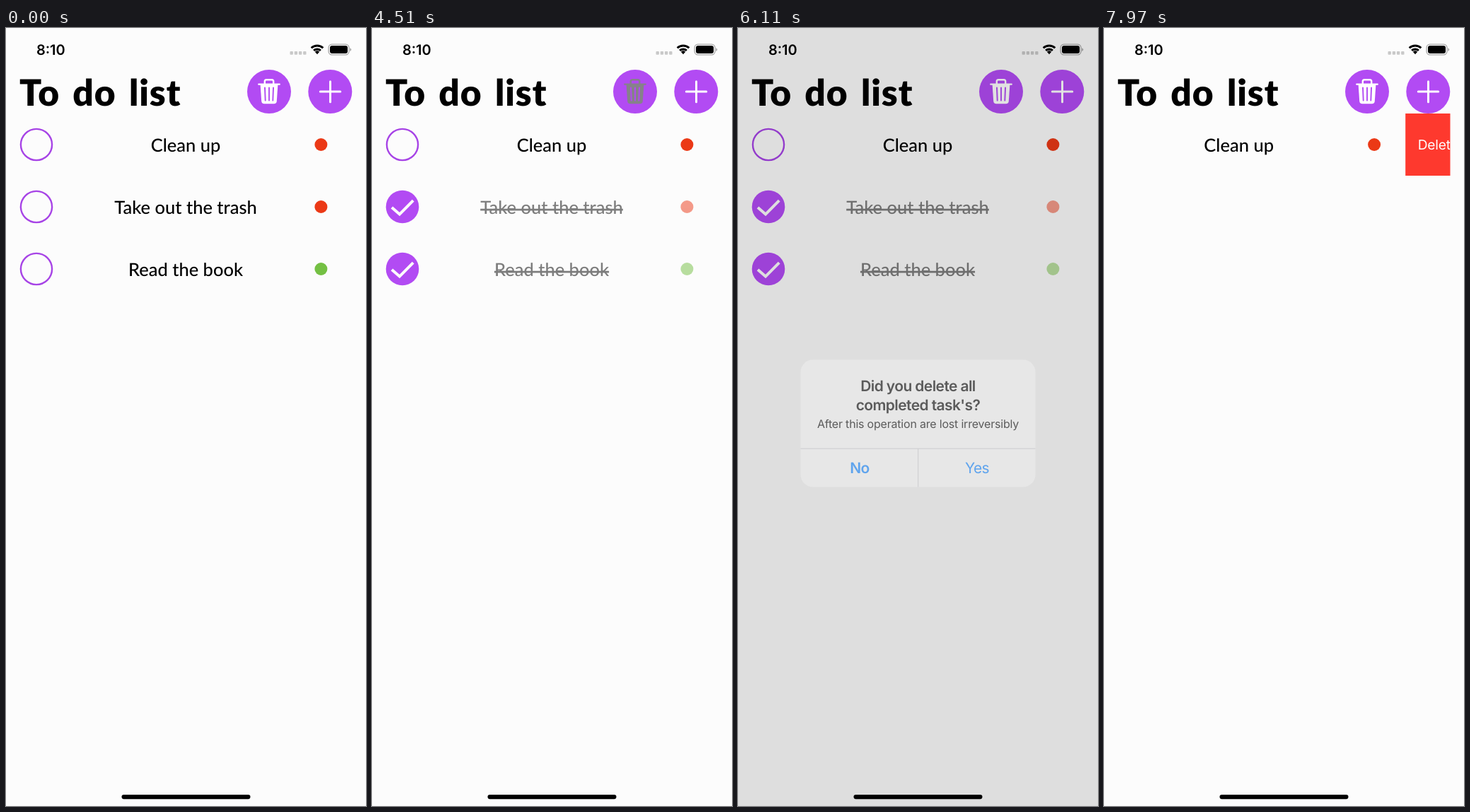
An HTML page for the animation above (8000 ms loop, 509 px wide and 1101 px high).

```html
<!DOCTYPE html>
<html lang="en">
<head>
<meta charset="utf-8">
<title>To do list</title>
<style>
  html, body { margin: 0; width: 100%; height: 100%; overflow: hidden; background: #fcfcfc; }
  svg { display: block; width: 509px; height: 1101px; }
  text { text-rendering: geometricPrecision; }
  .ui { font-family: Inter, "Liberation Sans", sans-serif; }
  .time { font-size: 20px; font-weight: 600; }
  .title { font: 900 51.5px Lato, sans-serif; letter-spacing: .9px; word-spacing: 5.5px; }
  .task { font: 500 25.5px Lato, sans-serif; text-anchor: middle; }
  .mid { text-anchor: middle; letter-spacing: -.6px; font-size: 21px; }
  .bold { font-weight: 600; }
  .note { font-size: 16px; letter-spacing: -.2px; }
  .link { fill: #087cf8; }
  .delete { font-size: 19.2px; letter-spacing: -.2px; fill: #fff; }
</style>
</head>
<body>
<svg viewBox="0 0 509 1101">
  <defs>
    <clipPath id="table"><rect x="19" y="121" width="470.5" height="920"/></clipPath>
  </defs>
  <rect width="509" height="1101" fill="#fcfcfc"/>

  <text class="ui time" x="42.9" y="37.5">8:10</text>
  <g fill="#c9c9c9">
    <rect x="401.5" y="33" width="4.4" height="4.8" rx="1"/>
    <rect x="407.7" y="33" width="4.4" height="4.8" rx="1"/>
    <rect x="413.9" y="33" width="4.4" height="4.8" rx="1"/>
    <rect x="420.1" y="33" width="4.4" height="4.8" rx="1"/>
  </g>
  <g id="wifi" fill="none" stroke="#000"></g>
  <rect x="456.1" y="23.1" width="28.8" height="14.8" rx="4.6" fill="none" stroke="#a4a4a4" stroke-width="1.3"/>
  <rect x="458" y="25" width="25" height="11" rx="3" fill="#000"/>
  <path d="M486.3 28.2q1.9.6 1.9 2.4t-1.9 2.4z" fill="#a4a4a4"/>

  <text class="title" x="19" y="109.5">To do list</text>

  <circle cx="372" cy="90" r="31" fill="#b24bf3"/>
  <g id="trash" fill="#fff" stroke="#fff">
    <path d="M357.3 79.6H386.7M365.8 79V75.6Q365.8 73.2 368.2 73.2H375.8Q378.2 73.2 378.2 75.6V79"
      fill="none" stroke-width="2.4" stroke-linecap="round"/>
    <path d="M359.6 80H384.4L382.8 103.4Q382.5 107.2 378.8 107.2H365.2Q361.5 107.2 361.2 103.4Z" stroke="none"/>
    <path d="M366 84.5L366.7 102.5M372 84.5V102.5M378 84.5L377.3 102.5"
      fill="none" stroke="#b24bf3" stroke-width="1.9" stroke-linecap="round"/>
  </g>
  <circle cx="458.3" cy="90" r="31" fill="#b24bf3"/>
  <path d="M444.3 90H472.7M458.5 75.8V104.8" stroke="#fff" stroke-width="3" stroke-linecap="round"/>

  <g clip-path="url(#table)">
    <g id="rows"></g>
    <g id="swipe">
      <rect x="489.5" y="121" width="110" height="88" fill="#fe392e"/>
      <text class="ui delete" x="507" y="172">Delete</text>
    </g>
  </g>

  <rect id="dim" width="509" height="1101" fill="#000"/>
  <g id="alert">
    <rect x="88.5" y="469.5" width="332" height="180" rx="17.5" fill="#eee"/>
    <path d="M88.5 595.2H420.5M254.7 595.2V649.5" stroke="#bfbfc6" stroke-width="1"/>
    <g class="ui">
      <text class="mid bold" x="254.5" y="514">Did you delete all</text>
      <text class="mid bold" x="254.5" y="541">completed task's?</text>
      <text class="mid note" x="254.5" y="565.5">After this operation are lost irreversibly</text>
      <text class="mid bold link" x="172" y="630">No</text>
      <text class="mid link" x="338" y="630">Yes</text>
    </g>
  </g>
  <rect x="163.5" y="1085" width="182" height="6.2" rx="3.1" fill="#000"/>
</svg>
<script>
const LOOP = 8000, ROW = 88, FADE = 530;
const RED = '#eb3916', GREEN = '#74c043';

// Each toggle flips the task between open and done.
const tasks = [
  { text: 'Clean up', color: RED, toggles: [500, 1340] },
  { text: 'Take out the trash', color: RED, toggles: [2830], removed: true },
  { text: 'Read the book', color: GREEN, toggles: [2070], removed: true },
];

const byId = id => document.getElementById(id);

function add(parent, tag, attrs, text) {
  const el = document.createElementNS('http://www.w3.org/2000/svg', tag);
  for (const key in attrs) el.setAttribute(key, attrs[key]);
  if (text) el.textContent = text;
  return parent.appendChild(el);
}

const progress = (t, from, to) => Math.min(1, Math.max(0, (t - from) / (to - from)));
const smooth = p => p * p * (3 - 2 * p);
const easeOut = p => 1 - (1 - p) ** 3;

function drawWifi() {
  const half = 43 * Math.PI / 180;
  for (const [r, width] of [[2.3, 4.6], [7.2, 2.9], [12.2, 2.9]]) {
    const dx = r * Math.sin(half), y = 37.2 - r * Math.cos(half);
    add(byId('wifi'), 'path', {
      d: `M${440 - dx} ${y}A${r} ${r} 0 0 1 ${440 + dx} ${y}`, 'stroke-width': width,
    });
  }
}

function buildRow(task, i) {
  const g = add(byId('rows'), 'g', {});
  const cy = 165 + i * ROW;
  const ring = add(g, 'circle', {
    cx: 43, cy, r: 22.1, fill: 'none', stroke: '#a744e6', 'stroke-width': 2.4,
  });
  const tick = add(g, 'g', {});
  add(tick, 'circle', { cx: 43, cy, r: 23.3, fill: '#b24bf3' });
  add(tick, 'path', {
    d: `M28 ${cy + 1}L39 ${cy + 10.6}L58.2 ${cy - 8.8}`,
    fill: 'none', stroke: '#fcfcfc', 'stroke-width': 4,
  });
  const body = add(g, 'g', {});
  const label = add(body, 'text', { class: 'task', x: 254, y: cy + 10.3 }, task.text);
  const half = label.getComputedTextLength() / 2;
  const strike = add(body, 'path', {
    d: `M${254 - half} ${cy + 4.2}H${254 + half}`, stroke: '#000', 'stroke-width': 2.7,
  });
  add(body, 'circle', { cx: 445.4, cy, r: 9, fill: task.color });
  return { ...task, g, ring, tick, body, strike };
}

function show(el, visible) {
  el.style.display = visible ? '' : 'none';
}

function drawRow(row, t, gone, shift) {
  const past = row.toggles.filter(at => t >= at);
  const done = past.length % 2 === 1;
  const p = past.length ? smooth(progress(t, past.at(-1), past.at(-1) + FADE)) : 1;
  show(row.ring, !done);
  show(row.tick, done);
  show(row.strike, done);
  row.body.setAttribute('opacity', done ? 1 - p / 2 : .5 + p / 2);
  row.g.setAttribute('opacity', row.removed ? 1 - gone : 1);
  row.g.setAttribute('transform', `translate(${-shift} 0)`);
}

function drawAlert(t) {
  const leave = smooth(progress(t, 5930, 6340));
  const alpha = smooth(progress(t, 4560, 4960)) * (1 - leave);
  const scale = 1.2 - .2 * easeOut(progress(t, 4560, 5110));
  byId('dim').setAttribute('opacity', .2 * alpha);
  byId('alert').setAttribute('opacity', alpha);
  byId('alert').setAttribute('transform',
    `translate(254.5 559.5) scale(${scale}) translate(-254.5 -559.5)`);
}

function draw(t) {
  const gone = smooth(progress(t, 6340, 6730));
  const shift = t < 7750 ? 0 : 4 + 59.3 * progress(t, 7750, 7970) ** 1.15;
  rows.forEach(row => drawRow(row, t, gone, shift));
  show(byId('swipe'), shift > 0);
  byId('swipe').setAttribute('transform', `translate(${-shift} 0)`);

  const icon = t >= 4510 && t < 4580 ? '#86818a' : '#fff';
  byId('trash').setAttribute('fill', icon);
  byId('trash').setAttribute('stroke', icon);
  drawAlert(t);
}

drawWifi();
const rows = tasks.map(buildRow);
const start = performance.now();
function frame() {
  draw((performance.now() - start) % LOOP);
  requestAnimationFrame(frame);
}
frame();
</script>
</body>
</html>
```
